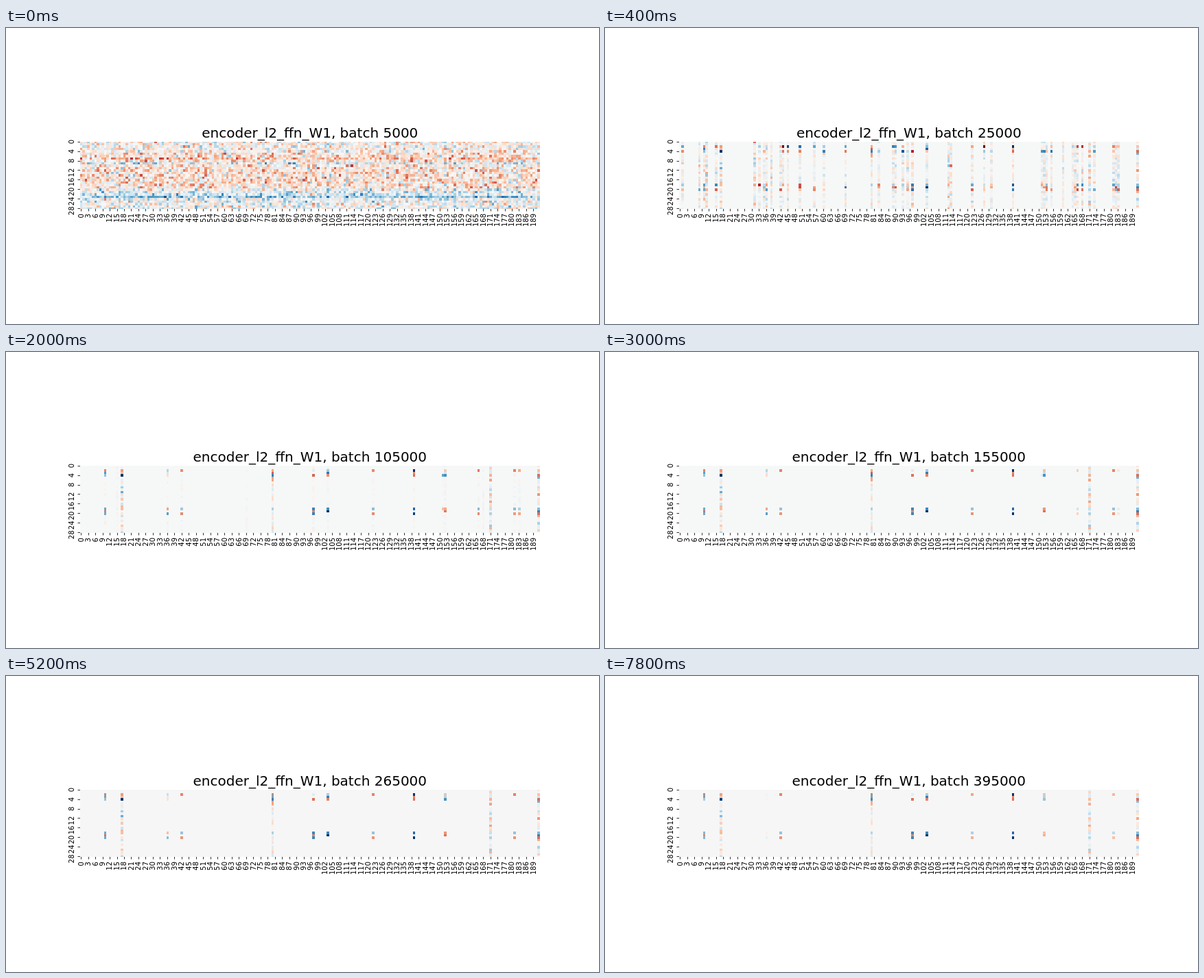
Animation of 864x432 px, one loop 8 s. Source, as an HTML page with a canvas:

```html
<!DOCTYPE html>
<html lang="en">
<head>
<meta charset="utf-8">
<title>Weight heatmap</title>
<style>
  html, body { margin: 0; width: 100%; height: 100%; overflow: hidden; background: #fff; }
  canvas, svg { position: absolute; left: 0; top: 0; }
  text { font-family: "DejaVu Sans", sans-serif; font-size: 10px; text-anchor: end; }
  #title { font-size: 20px; text-anchor: middle; }
</style>
</head>
<body>
<canvas id="map" width="864" height="432"></canvas>
<svg id="axes" width="864" height="432" viewBox="0 0 864 432">
  <text id="title" x="442.8" y="160"></text>
</svg>
<script>
const COLS = 192, ROWS = 29, STEP = 200, STEPS = 40;
const LEFT = 108, TOP = 166.1, CELL = 669.6 / COLS, BOTTOM = TOP + 28 * CELL;

const RAMP = ['#67001f', '#b2182b', '#d6604d', '#f4a582', '#fddbc7', '#f7f7f7',
  '#d1e5f0', '#92c5de', '#4393c3', '#2166ac', '#053061']
  .map(hex => [1, 3, 5].map(k => parseInt(hex.slice(k, k + 2), 16)));

// Surviving columns: step at which each vanishes, then rows 2-4 and 18-20.
const STRONG = {
  10: [70, -.5, .55, .4, .5, -.55, .5],
  17: [75, -.5, 0, .95, -.5, -.2, -.2],
  36: [42, .3, .15, -.2, -.4, 0, .55],
  69: [9, .4, 0, -.5, -.35, .9, 0],
  80: [75, -.55, -.4, .6, .1, 0, .35],
  97: [99, .12, 0, -.55, .65, -.5, .65],
  103: [85, .35, .7, -.5, .65, .98, 0],
  139: [99, .98, -.5, -.55, .78, 0, .98],
  151: [16, 0, 0, .75, -.4, 0, 0],
  152: [58, -.3, .25, .6, -.45, -.55, 0],
  191: [99, 0, 0, -.55, .35, .75, -.55]
};
// Columns that share one sparse pattern, with the step at which each vanishes.
const SIMILAR = { 15: 8, 42: 85, 122: 65, 166: 20, 168: 9, 181: 58, 183: 17 };
for (const c in SIMILAR) STRONG[c] = [SIMILAR[c], -.5, 0, 0, .4, 0, -.45];

const STRIPES = [17, 80, 171, 191];
const BRIEF = [8, 11, 31, 38, 112, 113];
const GREYED = [10, 80, 152];
const HOT_ROWS = [2, 4, 18, 19, 20];

function rand(a, b, salt) {
  let h = Math.imul(a + 1, 374761393) ^ Math.imul(b + 1, 668265263) ^ Math.imul(salt, 974711);
  h = Math.imul(h ^ (h >>> 13), 1274126177);
  h = Math.imul(h ^ (h >>> 16), 2246822519);
  return ((h ^ (h >>> 15)) >>> 0) / 4294967296;
}
const noise = (r, c) => rand(r, c, 1) + rand(r, c, 2) + rand(r, c, 3) - 1.5;
const clamp = (v, lo, hi) => Math.max(lo, Math.min(hi, v));
const fade = (step, end) => clamp(2 * (1 - step / end), 0, 1);

// Mean of each row before training thins the weights out.
function rowBias(r) {
  if (r === 23) return .38;
  if (r === 7) return -.26;
  if (r === 9 || r === 21 || r === 22) return .14;
  return r > 19 ? .06 : r < 5 ? -.02 : -.12;
}

function strongPart(r, c, step) {
  const column = STRONG[c];
  if (!column) return 0;
  const k = r > 17 ? r - 14 : r - 1;
  const inBand = (r > 1 && r < 5) || (r > 17 && r < 21);
  return inBand ? column[k] * fade(step, column[0]) : 0;
}

function hazePart(r, c, step) {
  const n = noise(r, c);
  let v = 0;
  if (STRIPES.includes(c)) v += n * .4 * fade(step, 70);
  else if (STRONG[c]) v += n * .25 * fade(step, 11);
  else if (BRIEF.includes(c)) v += n * .4 * fade(step, 9);
  else if (rand(c, 3, 6) < .17) {
    v += n * (HOT_ROWS.includes(r) ? .75 : .22) * fade(step, 3.5 + rand(c, 3, 5) * 1.5);
  }
  return v;
}

function weight(r, c, step) {
  const n = noise(r, c);
  if (step === 0) return rowBias(r) + n * .42;
  const rest = step === 1 ? (rowBias(r) * .5 + n * .4) * rand(c, 7, 4) * .45 : 0;
  return rest + strongPart(r, c, step) + hazePart(r, c, step);
}

function color(v) {
  const p = clamp((v + 1) * 5, 0, 10), k = Math.min(9, Math.floor(p));
  return `rgb(${RAMP[k].map((a, j) => Math.round(a + (RAMP[k + 1][j] - a) * (p - k)))})`;
}

const ctx = document.getElementById('map').getContext('2d');
const title = document.getElementById('title');
const colEdge = c => Math.round(LEFT + c * CELL);
const rowEdge = r => Math.round(clamp(TOP + (r - .5) * CELL, TOP, BOTTOM));

function draw(step) {
  title.textContent = `encoder_l2_ffn_W1, batch ${5000 + 10000 * step}`;
  ctx.fillStyle = step < 26 ? '#f6f8f7' : '#f6f6f6';
  ctx.fillRect(LEFT, 166, 670, 98);
  for (let c = 0; c < COLS; c++) {
    for (let r = 0; r < ROWS; r++) {
      const v = weight(r, c, step);
      if (Math.abs(v) < .012) continue;
      const grey = step > 15 && (r === 2 || r === 3) && GREYED.includes(c);
      ctx.fillStyle = grey ? (c === 152 ? '#cdcdcd' : '#999') : color(v);
      const x = colEdge(c), y = rowEdge(r);
      ctx.fillRect(x, y, colEdge(c + 1) - x, rowEdge(r + 1) - y);
    }
  }
}

const axes = document.getElementById('axes');
function add(tag, attrs, label = '') {
  const el = document.createElementNS('http://www.w3.org/2000/svg', tag);
  for (const name in attrs) el.setAttribute(name, attrs[name]);
  el.textContent = label;
  axes.append(el);
}
function tick(x, y, dx, dy, labelX, labelY, label) {
  add('path', { d: `M${x} ${y}l${dx} ${dy}`, stroke: '#000', 'stroke-width': .8 });
  add('text', { transform: `translate(${labelX} ${labelY}) rotate(-90)` }, label);
}
for (let c = 0; c < COLS; c += 3) {
  const x = LEFT + (c + .5) * CELL;
  tick(Math.floor(x) + .5, 264, 0, 3.5, x + 2.9, 271, c);
}
for (let r = 0; r < ROWS; r += 4) {
  const y = TOP + r * CELL;
  tick(LEFT, Math.floor(y) + .5, -3.5, 0, 98.9, y - 3.3, r);
}

let shown = -1;
const start = performance.now();
function update(now) {
  const step = Math.floor(Math.max(0, now - start) / STEP) % STEPS;
  if (step !== shown) draw(shown = step);
  requestAnimationFrame(update);
}
update(start);
</script>
</body>
</html>
```
